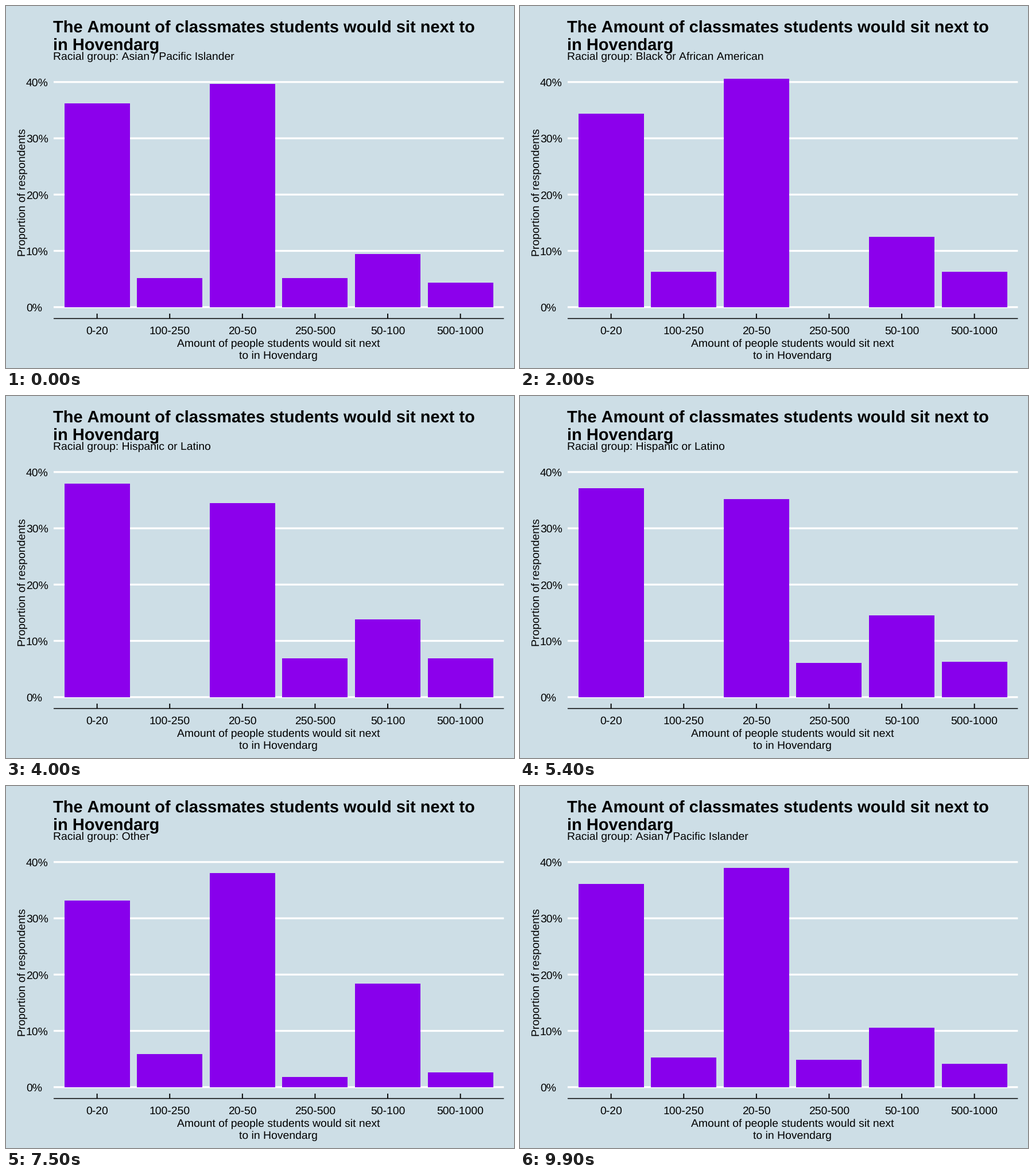
These frames come from a looping animation (885x632 px, 10 s). A matplotlib script:

```python
import matplotlib.pyplot as plt
from matplotlib.animation import FuncAnimation
from matplotlib.patches import Rectangle

W, H, DPI = 885, 632, 64
HOLD, STEPS = 14, 7          # frames at rest, steps per transition
CYCLE = HOLD + STEPS - 1

BG = "#CDDEE6"
PURPLE, PURPLE_MOVING = "#8C00EC", "#8800EC"

LEFT, RIGHT = 83, 867.4
BASE, PER_CENT = 525.75, 9.825
AXIS_Y = 545.6
MID_X, STEP_X = 475.15, 126.6
BAR_W = 0.9 * STEP_X
TEXT, TITLE = 19.33, 29
TITLE_X, CAPTION_X = 82, 474.3

BINS = ["0-20", "100-250", "20-50", "250-500", "50-100", "500-1000"]

# Respondents per bin for each group
GROUPS = [
    ("Asian / Pacific Islander", [42, 6, 46, 6, 11, 5]),
    ("Black or African American", [11, 2, 13, 0, 4, 2]),
    ("Hispanic or Latino", [11, 0, 10, 2, 4, 2]),
    ("Other", [27, 5, 33, 1, 16, 2]),
    ("White", [55, 9, 54, 5, 26, 5]),
]
SHARES = [[100 * n / sum(counts) for n in counts] for _, counts in GROUPS]

plt.rcParams.update({
    "font.family": "Liberation Sans",
    "text.hinting": "none",
    "text.kerning_factor": 6,
})

fig = plt.figure(figsize=(W / DPI, H / DPI), dpi=DPI, facecolor=BG)
ax = fig.add_axes([0, 0, 1, 1])
ax.set_xlim(0, W)
ax.set_ylim(H, 0)
ax.axis("off")


def points(px):
    return px * 72 / DPI


def label(x, y, text, size=TEXT, **style):
    return ax.text(x, y, text, fontsize=points(size), color="black",
                   va="baseline", zorder=4, **style)


def line(xs, ys, width, color, zorder):
    ax.plot(xs, ys, color=color, lw=points(width), zorder=zorder,
            solid_capstyle="butt", snap=False)


for pct in range(0, 50, 10):
    y = BASE - pct * PER_CENT
    line([LEFT, RIGHT], [y, y], 3.27, "white", 1)
    label(35, y + 7.3, f"{pct}%")

# Bar edges fall on whole pixels
floor_y = round(BASE)
bars = []
for i, name in enumerate(BINS):
    x = MID_X + (i - 2.5) * STEP_X
    x0, x1 = round(x - BAR_W / 2), round(x + BAR_W / 2)
    bar = Rectangle((x0, floor_y), x1 - x0, 0, lw=0, zorder=2, snap=False)
    bars.append(ax.add_patch(bar))
    line([x, x], [AXIS_Y, AXIS_Y - 8.5], 1.87, "black", 3)
    label(x, 573, name, ha="center")
line([LEFT, RIGHT], [AXIS_Y, AXIS_Y], 1.5, "black", 3)

label(TITLE_X, 46, "The Amount of classmates students would sit next to",
      TITLE, weight="bold")
label(TITLE_X, 77, "in Hovendarg", TITLE, weight="bold")
subtitle = label(TITLE_X, 93.6, "")
label(CAPTION_X, 595, "Amount of people students would sit next", ha="center")
label(CAPTION_X, 615.6, "to in Hovendarg", ha="center")
label(34, 325.4, "Proportion of respondents", ha="center",
      rotation=90, rotation_mode="anchor")


def update(frame):
    now, phase = divmod(frame, CYCLE)
    nxt = (now + 1) % len(GROUPS)
    t = max(0, phase - HOLD + 1) / STEPS
    subtitle.set_text("Racial group: " + GROUPS[nxt if t > 0.5 else now][0])
    for bar, a, b in zip(bars, SHARES[now], SHARES[nxt]):
        # Bars missing from either group only show while at rest
        bar.set_visible(a > 0 and (t == 0 or b > 0))
        top = round(BASE - (a + (b - a) * t) * PER_CENT)
        bar.set_height(top - floor_y)
        bar.set_facecolor(PURPLE_MOVING if t else PURPLE)
    return [*bars, subtitle]


anim = FuncAnimation(fig, update, frames=CYCLE * len(GROUPS), interval=100,
                     init_func=lambda: update(0), repeat=True, repeat_delay=0)
plt.show()
```
